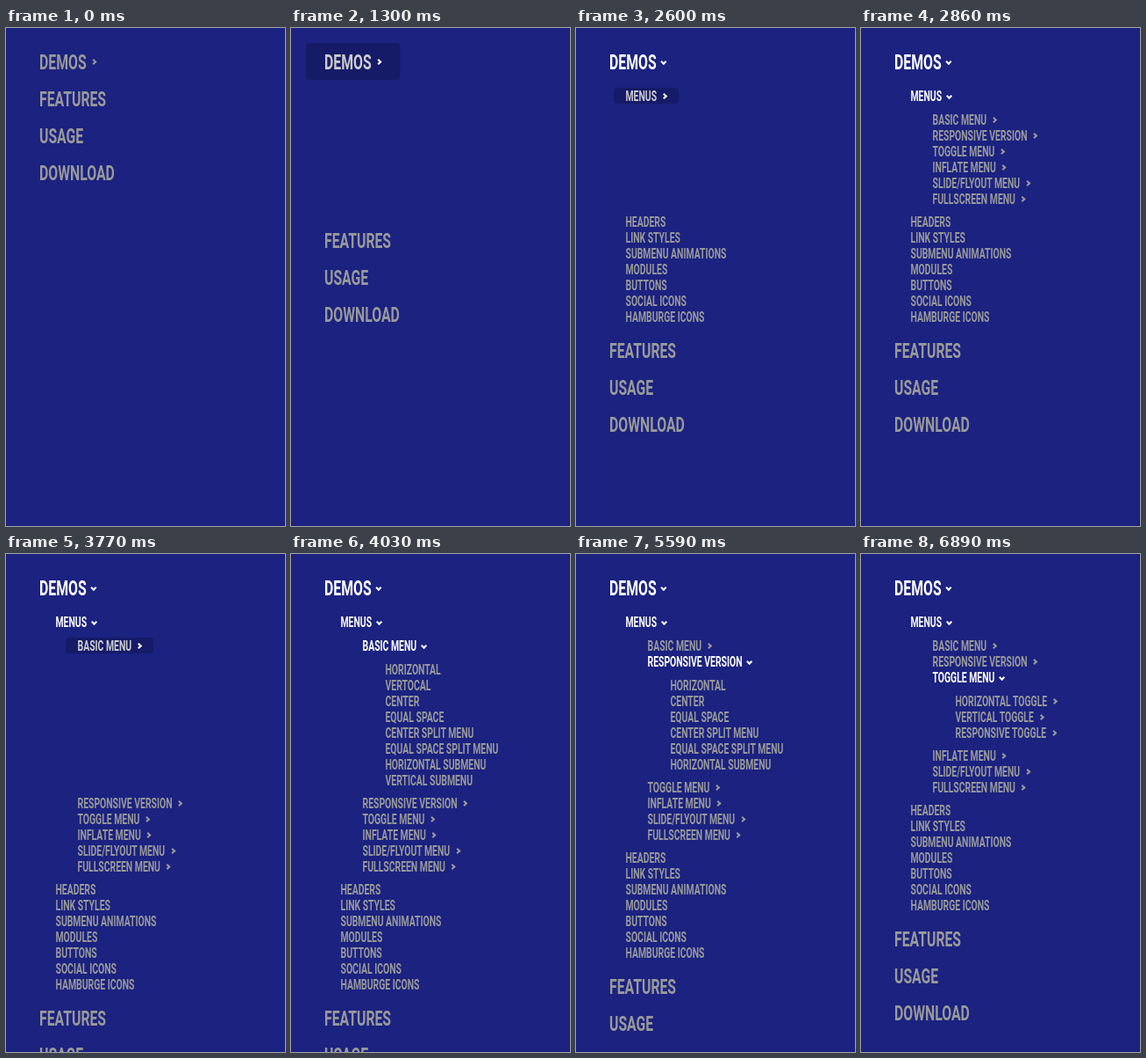
Recreate the animation shown at these times as an HTML page. Size 318x566 px, loop 7.02 s.

```html
<!DOCTYPE html>
<html lang="en">
<head>
<meta charset="utf-8">
<title>Nested menu</title>
<style>
  html, body { margin: 0; width: 100%; height: 100%; overflow: hidden; background: #1b2280; }
  body { --squeeze: .65; position: relative; font: 700 16px/18px Roboto, sans-serif; color: #999; }
  ul { list-style: none; margin: 0 0 0 25.5px; padding: 9px 0 8px; }
  #menu { position: absolute; left: 17px; top: 17px; margin: 0; padding: 0; }

  /* The condensed look comes from one horizontal scale shared by every row. */
  .row {
    position: relative; display: flex; align-items: center; width: max-content; height: 18px;
    padding: 0 calc(13.5px / var(--squeeze)); white-space: nowrap;
    transform: scaleX(var(--squeeze)); transform-origin: 0 50%;
  }
  #menu > li > .row {
    height: 42px; padding: 0 calc(21px / var(--squeeze)); font-size: 24.3px; line-height: 42px;
  }
  .row span { position: relative; top: .6px; }
  .row::after {
    content: ""; position: absolute; inset: 0; border-radius: 6px / 4px;
    background: rgba(0, 0, 0, .2); opacity: var(--tap, 0);
  }
  .chevron {
    box-sizing: border-box; width: 5px; height: 5px; z-index: 1;
    margin: 0 calc(3px / var(--squeeze) - 2.5px) 0 calc(8.4px / var(--squeeze) - 2.5px);
    border: solid; border-width: 2px 2px 0 0;
    transform: scaleX(calc(1 / var(--squeeze))) rotate(calc(45deg + var(--turn, 0deg)));
  }
</style>
</head>
<body>
<ul id="menu"></ul>
<script>
const LOOP = 7020, STEP = 130, FADE = 260;

const leaf = label => ({ label });
const branch = (label, items = [], start = Infinity, end = LOOP) => ({ label, items, start, end });
const leaves = text => text.split(", ").map(leaf);

const menu = [
  branch("DEMOS", [
    branch("MENUS", [
      branch("BASIC MENU", leaves("HORIZONTAL, VERTOCAL, CENTER, EQUAL SPACE, CENTER SPLIT MENU, EQUAL SPACE SPLIT MENU, HORIZONTAL SUBMENU, VERTICAL SUBMENU"), 3770, 5330),
      branch("RESPONSIVE VERSION", leaves("HORIZONTAL, CENTER, EQUAL SPACE, CENTER SPLIT MENU, EQUAL SPACE SPLIT MENU, HORIZONTAL SUBMENU"), 5330, 6630),
      branch("TOGGLE MENU", ["HORIZONTAL TOGGLE", "VERTICAL TOGGLE", "RESPONSIVE TOGGLE"].map(label => branch(label)), 6630),
      branch("INFLATE MENU"),
      branch("SLIDE/FLYOUT MENU"),
      branch("FULLSCREEN MENU")
    ], 2600),
    ...leaves("HEADERS, LINK STYLES, SUBMENU ANIMATIONS, MODULES, BUTTONS, SOCIAL ICONS, HAMBURGE ICONS")
  ], 1300),
  ...leaves("FEATURES, USAGE, DOWNLOAD")
];

const animated = [];

function add(parent, tag, className = "") {
  const element = parent.appendChild(document.createElement(tag));
  element.className = className;
  return element;
}

function build(list, items) {
  for (const item of items) {
    const li = add(list, "li"), row = add(li, "div", "row");
    add(row, "span").textContent = item.label;
    if (!item.items) continue;
    add(row, "i", "chevron");
    if (!item.items.length) continue;
    const sub = add(li, "ul");
    build(sub, item.items);
    animated.push({ ...item, row, sub });
  }
}

const progress = (time, start) => Math.min(1, Math.max(0, (time - start) / FADE));

function draw() {
  const time = Math.floor(performance.now() % LOOP / STEP) * STEP;
  for (const { row, sub, start, end } of animated) {
    const open = time >= start && time < end;
    const opening = progress(time, start), closing = progress(time, end);
    row.style.color = open ? "#fff" : "";
    row.style.setProperty("--tap", open ? 1 - opening : 0);
    row.style.setProperty("--turn", 90 * (opening - closing) + "deg");
    sub.style.display = open ? "" : "none";
    sub.style.opacity = opening;
  }
  requestAnimationFrame(draw);
}

build(document.getElementById("menu"), menu);
draw();
</script>
</body>
</html>
```
